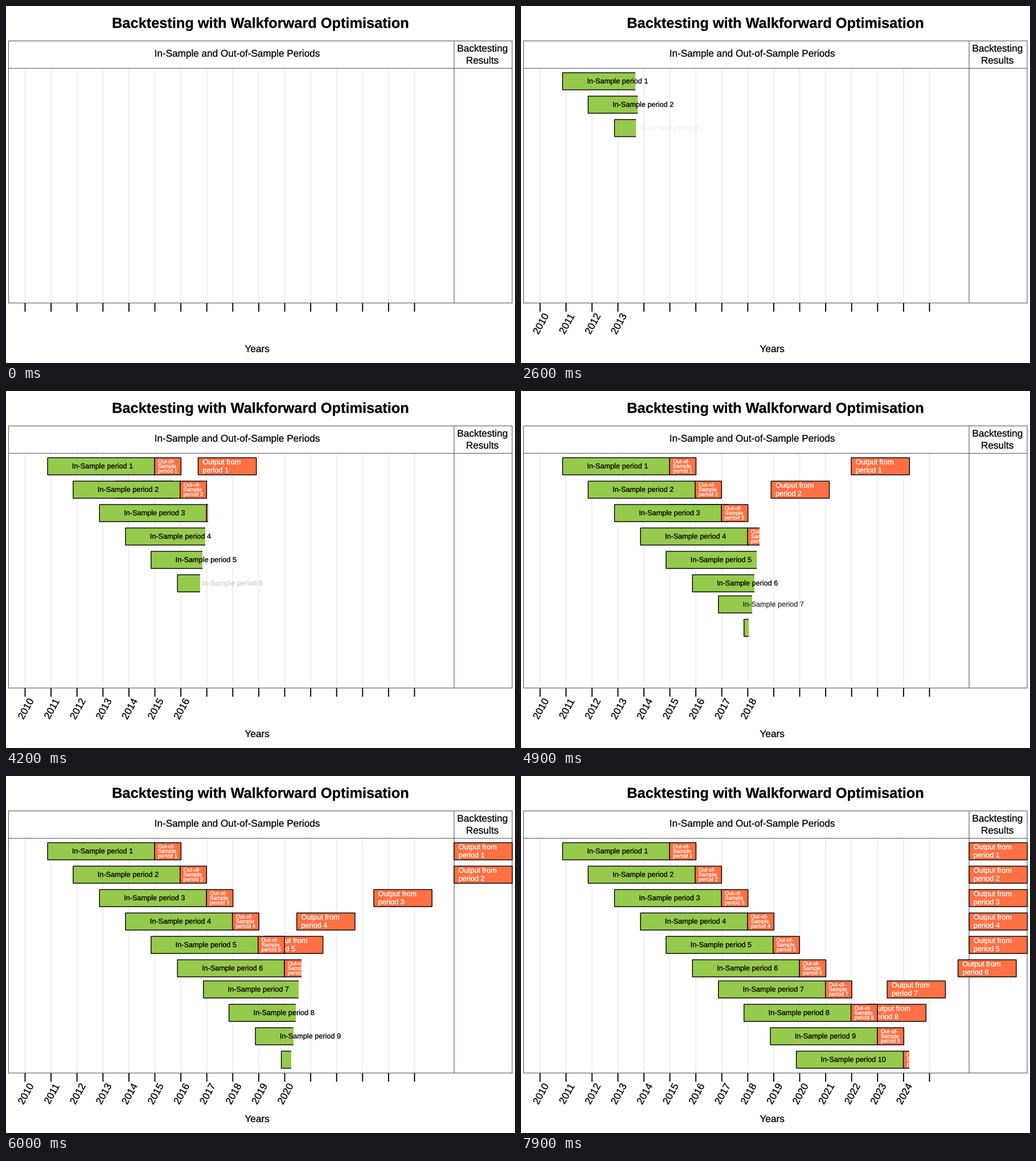
A matplotlib script for the animation above (8000 ms loop, 894 by 626 pixels).

```python
import matplotlib.pyplot as plt
from matplotlib.animation import FuncAnimation
from matplotlib.patches import PathPatch, Rectangle
from matplotlib.textpath import TextPath
from matplotlib.transforms import Affine2D, Bbox, TransformedBbox

W, H, DPI = 894, 626, 72
FRAMES, INTERVAL = 80, 100

GREEN, ORANGE = "#95ca4c", "#ff7043"
RULE, GRID = "#585858", "#f0f0f0"
FONT = {"family": "Liberation Sans"}
YEAR_STEP = 45.6
ROW_H, IN_W, BAR_W = 30, 188, 234.4
OUT_W, OUT_X = 102.3, 787
WIPE_SPEED = 4.028          # pixels per tick, 24 ticks per second

# start tick, start x and speed of each output box
OUTPUTS = [
    (91, 209, 14.27), (100, 191, 14.6), (115, 233, 14.24), (126, 344, 9.26),
    (136, 372, 10.3), (151, 437, 8.7), (163, 472.6, 6.56), (175, 515, 6.72),
]

fig = plt.figure(figsize=(W / DPI, H / DPI), dpi=DPI, facecolor="white")
ax = fig.add_axes([0, 0, 1, 1])
ax.set_xlim(0, W)
ax.set_ylim(H, 0)
ax.axis("off")


def glyphs(path, color="black", zorder=1):
    # a hairline outline gives the letters their slightly heavy look
    return ax.add_patch(PathPatch(path, fc=color, ec=color, lw=0.3,
                                  zorder=zorder))


def text(s, x, y, size, color="black", weight="normal", align="left",
         zorder=1, transform=None):
    path = TextPath((0, 0), s, size=size, prop={**FONT, "weight": weight})
    if align == "center":
        ink = path.get_extents()
        x -= (ink.x0 + ink.x1) / 2
    place = Affine2D().scale(1, -1).translate(x, y)
    patch = glyphs(place.transform_path(path), color, zorder)
    if transform is not None:
        patch.set_transform(transform)
    return patch


def year_label(year, x, y):
    path = TextPath((0, 0), str(year), size=17.5, prop=FONT)
    ink = path.get_extents()
    place = (Affine2D().translate(-(ink.x0 + ink.x1) / 2, -(ink.y0 + ink.y1) / 2)
             .rotate_deg(61).scale(1, -1).translate(x, y))
    return glyphs(place.transform_path(path))


def box(x, y, w, color, zorder, transform=None):
    patch = Rectangle((x, y), w, ROW_H, fc=color, ec="black", lw=1.4,
                      zorder=zorder, snap=False)
    if transform is not None:
        patch.set_transform(transform)
    return ax.add_patch(patch)


def line(x0, y0, x1, y1, color, lw):
    ax.plot([x0, x1], [y0, y1], color=color, lw=lw, zorder=1,
            solid_capstyle="butt", snap=False)


def row_top(i):
    return 117 + 41.05 * i - (4 if i >= 6 else 0)


class Row:
    """An in-sample bar with its out-of-sample end, revealed by a wipe."""

    def __init__(self, i):
        self.left = 73 + 45.62 * i - (0.7 if i % 3 == 1 else 0)
        self.start = 40.3 + 12.42 * (i - 1) if i else 30.3
        y = row_top(i)
        out_x = self.left + IN_W
        self.parts = [
            box(self.left, y, IN_W, GREEN, 3),
            box(out_x, y, BAR_W - IN_W, ORANGE, 3),
        ]
        for n, s in enumerate(("Out-of-", "Sample", f"period {i + 1}")):
            self.parts.append(text(s, out_x + 5.8, y + 9.6 + 8.3 * n, 9.5,
                                   "white", zorder=3))
        self.clip = Bbox([[0, H], [0, 0]])
        for part in self.parts:
            part.set_clip_box(TransformedBbox(self.clip, ax.transData))
        self.label = text(f"In-Sample period {i + 1}", self.left + 42.9,
                          y + 18.8, 12.7, zorder=4)

    def update(self, tick):
        age = tick - self.start
        for part in self.parts:
            part.set_visible(age > 0)
        self.clip.intervalx = (0, self.left + WIPE_SPEED * max(age, 0))
        alpha = min(max((age - 8.9) / 7.8, 0), 1)
        self.label.set_visible(alpha > 0)
        self.label.set_alpha(alpha)


class Output:
    """A result box sliding out from behind its row to the last column."""

    def __init__(self, i, start, x, speed):
        self.start, self.x, self.speed = start, x, speed
        self.shift = Affine2D()
        move = self.shift + ax.transData
        y = row_top(i)
        self.parts = [
            box(0, y, OUT_W, ORANGE, 2, move),
            text("Output from", 7.9, y + 11.6, 12.7, "white", zorder=2,
                 transform=move),
            text(f"period {i + 1}", 7.9, y + 25.9, 12.7, "white", zorder=2,
                 transform=move),
        ]

    def update(self, tick):
        age = tick - self.start
        for part in self.parts:
            part.set_visible(age >= 0)
        x = min(self.x + self.speed * max(age, 0), OUT_X)
        self.shift.clear().translate(x, 0)


ticks = [33.5 + YEAR_STEP * k for k in range(16)]
for x in ticks:
    line(x, 110, x, 520.5, GRID, 2)
for y in (61.2, 109.3, 520.8):
    line(4, y, 889.5, y, RULE, 1.1)
for x in (4.5, 787, 889):
    line(x, 61, x, 521, RULE, 1.1)
for x in ticks:
    line(x, 521, x, 536, "black", 1.9)

text("Backtesting with Walkforward Optimisation", 447, 38.3, 25.35,
     weight="bold", align="center")
text("In-Sample and Out-of-Sample Periods", 406.5, 88.8, 17.15, align="center")
text("Backtesting", 837, 80, 17.2, align="center")
text("Results", 837, 101, 17.2, align="center")
text("Years", 441, 606.8, 17.2, align="center")

years = [year_label(2010 + k, x + 1.1, 557) for k, x in enumerate(ticks[:15])]
rows = [Row(i) for i in range(10)]
outputs = [Output(i, *spec) for i, spec in enumerate(OUTPUTS)]


def update(frame):
    tick = frame * 12 // 5
    for k, label in enumerate(years):
        label.set_visible(tick >= 18 + 12 * k)
    for item in rows + outputs:
        item.update(tick)
    return []


anim = FuncAnimation(fig, update, frames=FRAMES, interval=INTERVAL,
                     init_func=lambda: update(0), repeat=True,
                     repeat_delay=0, blit=False)
plt.show()
```
